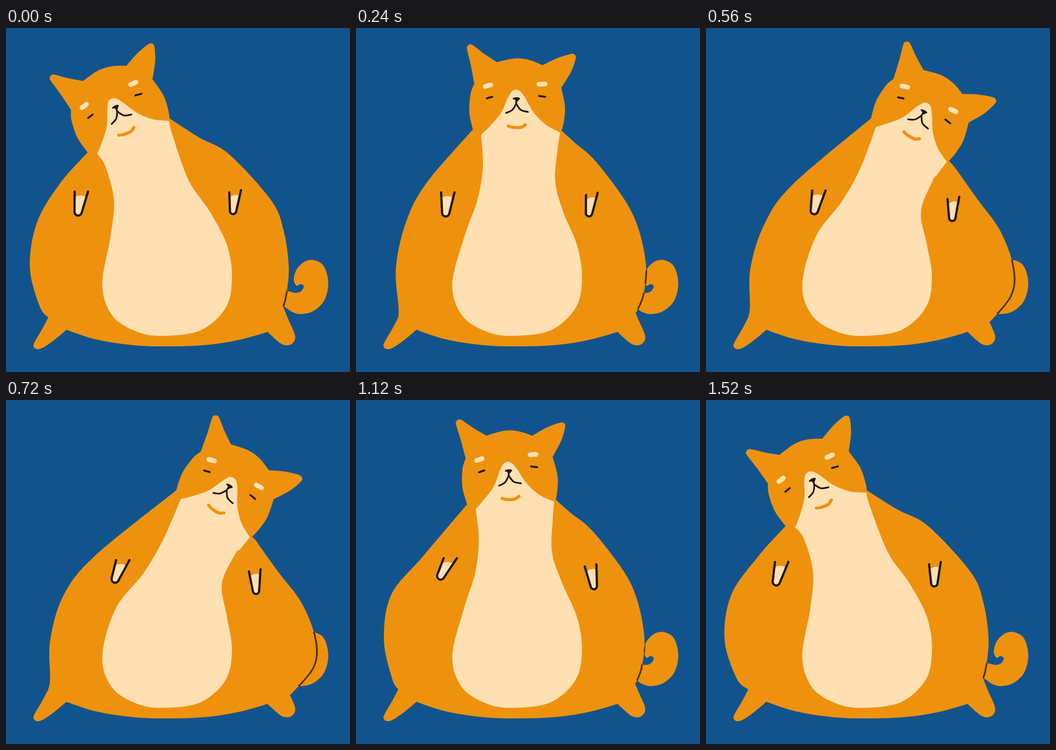
An HTML page with a canvas that plays this animation: 618 px wide and 618 px high, repeating every 1600 ms.

```html
<!DOCTYPE html>
<html lang="en">
<head>
<meta charset="utf-8">
<title>Swaying dog</title>
<style>
  html, body { margin: 0; height: 100%; overflow: hidden; background: #11548d; }
  canvas { display: block; width: 618px; height: 618px; }
</style>
</head>
<body>
<canvas id="stage" width="618" height="618"></canvas>
<script>
const ctx = document.getElementById('stage').getContext('2d');
const BLUE = '#11548d', ORANGE = '#ee920d', CREAM = '#ffe0b3', INK = '#1d150c';
const LOOP = 1600, STEP = 80, LEAD = 80;

// Timing of the sway: -1 leans fully left, 1 fully right.
const SWAY = [[0, -0.93], [240, -0.075], [400, 0.48], [670, 1.02],
  [960, 0.42], [1280, -0.77], [1450, -0.96]];

// Smooth periodic curve through the sway keys.
function swayAt(time) {
  const n = SWAY.length, t = time % LOOP;
  const key = i => [SWAY[(i + n) % n][0] + LOOP * Math.floor(i / n), SWAY[(i + n) % n][1]];
  const slope = i => {
    const [t0, v0] = key(i - 1), [t1, v1] = key(i), [t2, v2] = key(i + 1);
    const before = t1 - t0, after = t2 - t1;
    return ((v1 - v0) / before * after + (v2 - v1) / after * before) / (before + after);
  };
  let i = n - 1;
  while (SWAY[i][0] > t) i--;
  const [ta, a] = key(i), [tb, b] = key(i + 1);
  const u = (t - ta) / (tb - ta), v = 1 - u;
  return a * v * v * (1 + 2 * u) + b * u * u * (3 - 2 * u)
    + (tb - ta) * u * v * (slope(i) * v - slope(i + 1) * u);
}

// Each argument is a smooth run of points; runs meet at corners.
function shape(...runs) {
  const path = new Path2D();
  runs.forEach((pts, r) => {
    path[r ? 'lineTo' : 'moveTo'](...pts[0]);
    for (let i = 0; i < pts.length - 1; i++) {
      const p = pts[i], q = pts[i + 1], o = pts[i - 1] || p, s = pts[i + 2] || q;
      path.bezierCurveTo(
        p[0] + (q[0] - o[0]) / 6, p[1] + (q[1] - o[1]) / 6,
        q[0] - (s[0] - p[0]) / 6, q[1] - (s[1] - p[1]) / 6, q[0], q[1]);
    }
  });
  return path;
}

function fill(path, color) {
  ctx.fillStyle = color;
  ctx.fill(path);
}

function stroke(path, color, width) {
  ctx.strokeStyle = color;
  ctx.lineWidth = width;
  ctx.stroke(path);
}

const mix = (a, b, u) => [a[0] + (b[0] - a[0]) * u, a[1] + (b[1] - a[1]) * u];

const TAIL = shape(
  [[490, 472], [507, 473], [520, 476], [530, 473], [535, 464], [529, 460], [522, 463],
   [517, 452], [522, 434], [536, 420], [553, 417], [571, 428], [579, 458], [572, 489],
   [553, 508], [530, 514], [514, 510], [499, 500], [490, 500]]);
const LEFT_LEG = shape(
  [[84, 505], [66, 539], [51, 565], [50, 573], [56, 577], [67, 574], [86, 561], [110, 541]]);
const RIGHT_LEG = shape(
  [[497, 498], [507, 523], [518, 548], [519, 560], [511, 569], [498, 569], [485, 560], [468, 544]]);

// Head parts are drawn upright around the point between the brows.
const BROW_X = 285.5, BROW_Y = 100.5;
const HEAD = shape(
  [[209, 180], [203, 148], [206, 115], [213, 97]],
  [[213, 97], [207, 62], [201, 34], [203, 28], [208, 26], [215, 30], [231, 43], [254, 59]],
  [[254, 59], [286, 53], [312, 56], [336, 66]],
  [[336, 66], [362, 54], [386, 47], [394, 48], [396, 55], [387, 79], [369, 107]],
  [[369, 107], [375, 140], [373, 165], [368.5, 184]],
  [[289, 230]]);
const MASK = shape(
  [[223.5, 189], [242, 171], [260, 150], [272, 125], [280, 112], [288, 109], [296, 113],
   [305, 126], [319, 151], [340, 173], [365.5, 187.5]],
  [[290, 212]]);
const NOSE = shape([[283, 125], [288, 124], [293, 125]], [[288, 130]]);
const MOUTH = shape([[269, 150.5], [280, 145.5], [287, 135], [288, 129]],
  [[287.5, 134], [295.5, 145.5], [308.5, 149.5]]);
const CHIN = shape([[272.5, 174], [281, 176.5], [295, 177], [303, 172.5]]);
const BROWS = [shape([[232.5, 102], [242.5, 99.5]]), shape([[329, 100], [340, 100]])];
const EYES = [shape([[235, 123.5], [245, 121]]), shape([[329, 121], [340, 123]])];

// A cream paw in a U-shaped line: centre of the opening, offset to the tip, opening size.
function drawPaw(x, y, dx, dy, width, rise) {
  const a = [x - width / 2, y - rise / 2], b = [x + width / 2, y + rise / 2];
  const length = Math.hypot(dx, dy), reach = 1.9;
  const corner = [x + dx * reach, y + dy * reach];
  const halfAngle = Math.atan(width / 2 / (length * reach));
  const radius = length * (reach - 1) / (1 / Math.sin(halfAngle) - 1);
  const outline = (from, to) => {
    const path = new Path2D();
    path.moveTo(...from);
    path.arcTo(...corner, ...to, radius);
    path.lineTo(...to);
    return path;
  };
  const cuffA = mix(a, corner, 0.12), cuffB = mix(b, corner, 0.12);
  const paw = outline(cuffA, cuffB), top = mix(cuffA, cuffB, 0.5);
  paw.quadraticCurveTo(top[0], top[1] - 6, ...cuffA);
  fill(paw, CREAM);
  stroke(outline(a, b), INK, 4);
}

function draw(t) {
  const lean = swayAt(t), ahead = swayAt(t + LEAD), swing = ahead - lean;
  // A coordinate at rest, its drift with the sway and its bend at both extremes.
  const follow = sway => (rest, drift, bend = 0) => rest + drift * sway + bend * sway * sway;
  const at = follow(lean), hip = follow(ahead);

  const headX = at(294, 118), headY = at(102.5, 4.3, 25);
  const tilt = at(1, 27.8, 0.8) * Math.PI / 180;
  const c = Math.cos(tilt), s = Math.sin(tilt);
  const onHead = (x, y) => [headX + x * c - y * s, headY + x * s + y * c];

  const rightEdge = [
    onHead(83, 84),
    [at(397, 54), at(208, 29, 18)],
    [at(432, 30, -3), at(240, 20, 7)],
    [at(484, 7, -1), 310],
    [at(510, 16.5, 5), 365],
    [at(523, 24.5, 9), 430],
    [at(518, 25, 10), 480],
    [at(505, 7), at(510, 15, 4)]
  ];
  const leftEdge = [
    [76, 520],
    [hip(74, 13, -8), 500],
    [hip(67, 25, -12), 430],
    [hip(83, 32, -9), 350],
    [at(128, 33, -1), 280],
    onHead(-77, 79)
  ];
  const body = shape(rightEdge,
    [[470, 546], [420, 560], [365, 569], [300, 572], [230, 570], [160, 559], [108, 542]],
    leftEdge);
  const belly = shape([
    onHead(-62, 88),
    [at(232, 54, -3), 250],
    [at(220, 28), 310],
    [at(195, 5, -3), 375],
    [173, 461], [191, 517], [236, 546], [284, 553], [350, 543], [395, 502], [406, 448],
    [397, 390],
    [at(373, 11, 4), 330],
    [at(361, 43, 9), 275],
    onHead(75, 115),
    onHead(80, 87)
  ]);

  ctx.fillStyle = BLUE;
  ctx.fillRect(0, 0, 618, 618);
  ctx.lineCap = ctx.lineJoin = 'round';
  for (const part of [TAIL, LEFT_LEG, RIGHT_LEG, body]) fill(part, ORANGE);

  // The body's edge is inked only where it overlaps the tail.
  ctx.save();
  ctx.clip(TAIL);
  stroke(shape(rightEdge), '#4b300a', 3);
  ctx.restore();

  const drawOnHead = paint => {
    ctx.save();
    ctx.translate(headX, headY);
    ctx.rotate(tilt);
    ctx.translate(-BROW_X, -BROW_Y);
    paint();
    ctx.restore();
  };
  drawOnHead(() => fill(HEAD, ORANGE));
  fill(belly, CREAM);
  drawOnHead(() => {
    fill(MASK, CREAM);
    BROWS.forEach(brow => stroke(brow, CREAM, 8.5));
    EYES.forEach(eye => stroke(eye, INK, 3.4));
    fill(NOSE, INK);
    stroke(NOSE, INK, 3);
    stroke(MOUTH, INK, 3);
    stroke(CHIN, ORANGE, 5.5);
  });

  drawPaw(at(172, 36) - 15 * swing, 290 + 18 * swing, -13 + 30 * swing, 43.5, 24, 0);
  drawPaw(at(425, 18, 4), at(298.5, 6.5, 1), -20 * swing, 42, 21, -4);
}

const start = performance.now();
function tick() {
  const t = (performance.now() - start) % LOOP;
  draw(Math.floor(t / STEP) * STEP);
  requestAnimationFrame(tick);
}
tick();
</script>
</body>
</html>
```
